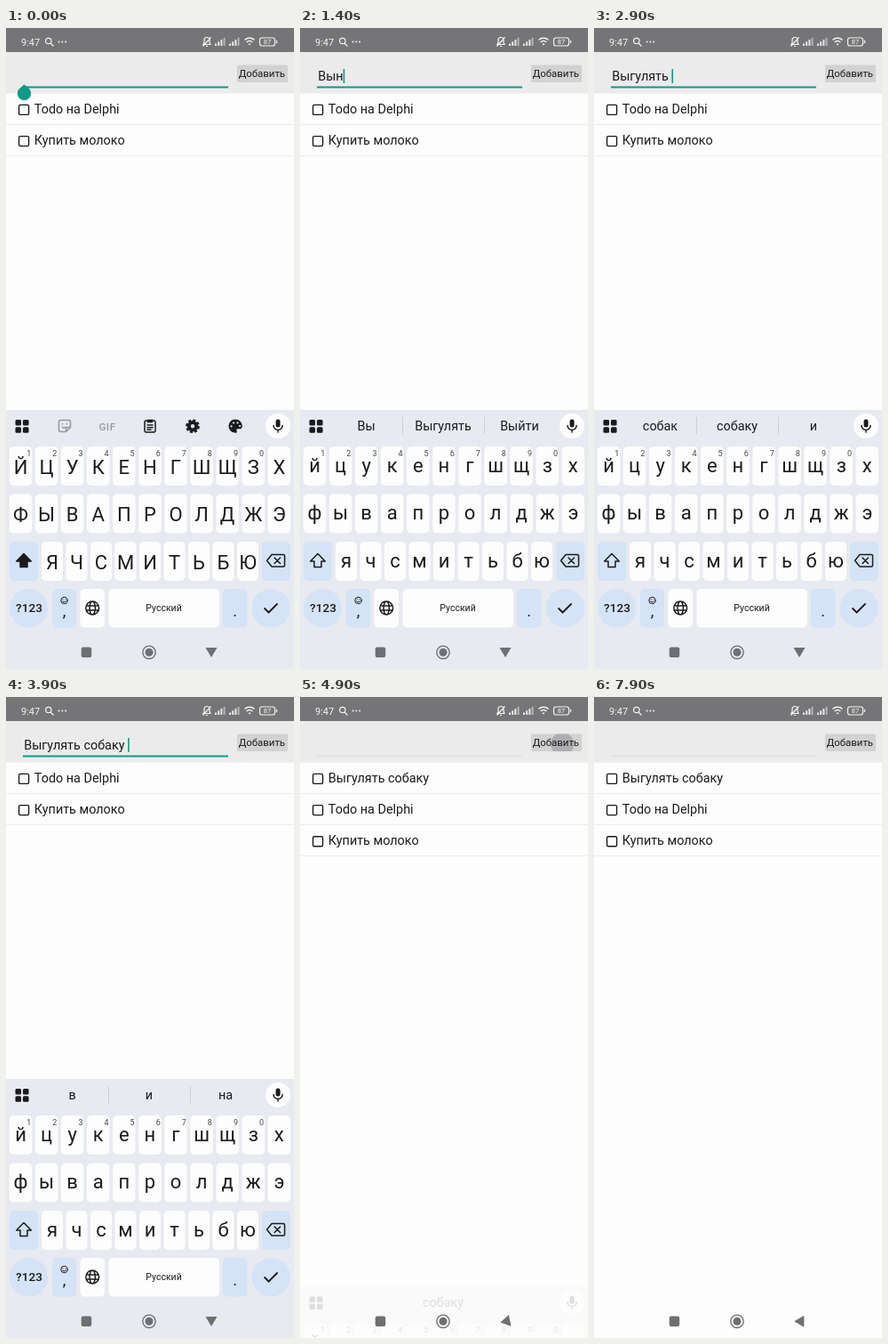
An HTML page that plays this animation: 324x720 px, repeating every 8 s.

```html
<!DOCTYPE html>
<html lang="ru">
<head>
<meta charset="utf-8">
<title>Todo</title>
<style>
  html, body { margin: 0; width: 100%; height: 100%; overflow: hidden; background: #fdfdfd; }
  svg { display: block; width: 324px; height: 720px; font-family: Roboto, sans-serif; }
  text { fill: #1b1b1d; white-space: pre; }
  .body { font-size: 14.4px; }
  .mid { text-anchor: middle; }
  .letter { font-size: 22px; text-anchor: middle; }
  .hint { font-size: 9px; text-anchor: middle; fill: #45464a; }
  .key { fill: #fdfdfd; }
  .mod { fill: #d4e3f5; }
  .line { fill: none; stroke: #1b1b1d; stroke-width: 1.5; stroke-linejoin: round; stroke-linecap: round; }
  .dark { fill: #1b1b1d; }
  .light { fill: none; stroke: #f4f4f4; stroke-width: 1.2; }
  .nav { fill: #6f6f71; }
  .teal { fill: #0d9a88; }
</style>
</head>
<body>
<svg viewBox="0 0 324 720">
  <rect width="324" height="720" fill="#fdfdfd"/>
  <rect y="27" width="324" height="46.5" fill="#ebebec"/>

  <g id="status">
    <rect width="324" height="27" fill="#757577"/>
    <text x="17" y="19.5" font-size="11" style="fill:#f4f4f4">9:47</text>
    <path class="light" d="M50 17l3.5 3.5M51 14.5a3.2 3.2 0 1 1-6.4 0a3.2 3.2 0 1 1 6.4 0"/>
    <path class="light" stroke-linecap="round" style="stroke-width:1.8" d="M59.5 15.5h.1M63.3 15.5h.1M67.1 15.5h.1"/>
    <path class="light" d="M222 18.5h8l-1-2v-3a3 3 0 0 0-6 0v3zM225 20.5h2M221.5 20.5L230.5 10.5"/>
    <g id="signals"></g>
    <path class="light" style="stroke-width:1.5" d="M268.5 13.5a8 8 0 0 1 11 0M270.7 16a5 5 0 0 1 6.6 0M273 18.5a2 2 0 0 1 2 0"/>
    <rect class="light" x="285.5" y="11" width="17" height="9" rx="2.5"/>
    <path class="light" d="M304.5 13.8v3.4"/>
    <text class="mid" x="294" y="18.3" font-size="7.5" style="fill:#f4f4f4">87</text>
  </g>

  <rect id="underline" x="19" y="65.5" width="231" height="2"/>
  <text id="field" class="body" x="20.2" y="59"></text>
  <rect id="cursor" class="teal" y="46" width="1.6" height="16"/>
  <path id="handle" class="teal" d="M20.5 63.5L26 68.3a7.6 7.6 0 1 1-11 0z"/>

  <clipPath id="buttonClip"><rect x="260" y="41.5" width="57" height="19.5" rx="1.5"/></clipPath>
  <g clip-path="url(#buttonClip)">
    <rect x="260" y="41" width="57" height="20" fill="#d2d2d3"/>
    <circle id="ripple" cx="295" cy="53" r="13" fill="#a6a6a8"/>
  </g>
  <text class="mid" x="287.9" y="55" font-size="11.4">Добавить</text>

  <g id="list"></g>

  <g id="keyboard">
    <rect y="429" width="324" height="320" fill="#e8eaf1"/>
    <g id="grid" class="dark"></g>
    <g id="tools">
      <path class="line" style="stroke:#97989c" d="M61.5 440.5h9a2 2 0 0 1 2 2v6l-5 5h-6a2 2 0 0 1-2-2v-9a2 2 0 0 1 2-2zM72.5 448.5h-3a2 2 0 0 0-2 2v3M63.5 444.5v.5M68.5 444.5v.5M63 448.3q2 1.7 4 0"/>
      <text class="mid" x="114" y="451.5" font-size="11.5" font-weight="500" letter-spacing=".6" style="fill:#97989c">GIF</text>
      <path class="line" d="M157.5 441h9a1.5 1.5 0 0 1 1.5 1.5v10a1.5 1.5 0 0 1-1.5 1.5h-9a1.5 1.5 0 0 1-1.5-1.5v-10a1.5 1.5 0 0 1 1.5-1.5zM159.5 440.5h5v2h-5zM159 446h6M159 448.7h6M159 451.3h4"/>
      <circle class="line" cx="210" cy="447.3" r="4.2" style="stroke-width:4"/>
      <circle cx="210" cy="447.3" r="6.6" fill="none" stroke="#1b1b1d" stroke-width="2.6" stroke-dasharray="3 2.184"/>
      <path class="dark" d="M258 439.5a7.6 7.6 0 0 0 0 15.2c2.2 0 2-1.5 1.5-2.4s.2-2 1.5-2h1.8c1.8 0 2.9-1.5 2.9-3.4 0-4-3.5-7.4-7.7-7.4z"/>
      <path d="M253.5 447.3h.1M256 443.5h.1M260.5 443.5h.1M263 447h.1" stroke="#e8eaf1" stroke-width="2.2" stroke-linecap="round"/>
    </g>
    <g id="suggestions">
      <path id="dividers" d="M115.5 437v19M207.5 437v19" stroke="#cccfd6"/>
      <text class="body mid" x="74.5" y="452"></text>
      <text class="body mid" x="161" y="452"></text>
      <text class="body mid" x="247" y="452"></text>
    </g>
    <circle class="key" cx="306" cy="447" r="14"/>
    <rect class="dark" x="303.5" y="439.5" width="5" height="9" rx="2.5"/>
    <path class="line" d="M301 446.5a5 5 0 0 0 10 0M306 451.5v2.5"/>

    <g id="keys"></g>
    <path id="shift" class="line" d="M20 590.5l8.3 8.5h-4.3v6.5h-8v-6.5h-4.3z"/>
    <path class="line" d="M299 591.5h13a1.5 1.5 0 0 1 1.5 1.5v10.5a1.5 1.5 0 0 1-1.5 1.5h-13l-5.5-6.7zM302 595l6.5 6.5M308.5 595l-6.5 6.5"/>
    <text class="mid" x="26" y="656" font-size="13.6" font-weight="500">?123</text>
    <circle class="line" cx="65.5" cy="643" r="3.7" style="stroke-width:1"/>
    <path class="line" style="stroke-width:1" d="M64 642h.1M67 642h.1M63.8 644.3q1.7 1.5 3.4 0"/>
    <text class="mid" x="65.5" y="661" font-size="18">,</text>
    <path class="line" d="M89.8 651.5a7.4 7.4 0 1 0 14.8 0a7.4 7.4 0 1 0-14.8 0M94 651.5a3.2 7.4 0 1 0 6.4 0a3.2 7.4 0 1 0-6.4 0M90.5 649h13.4M90.5 654h13.4"/>
    <text class="mid" x="177.5" y="655" font-size="10.5">Русский</text>
    <text class="mid" x="257.5" y="661" font-size="18">.</text>
    <path class="line" style="stroke-width:1.8" d="M291 652l4.5 4.5l9.5-9.5"/>
  </g>

  <g class="nav">
    <rect x="84.7" y="695.5" width="11.5" height="11.5" rx="2"/>
    <circle cx="161" cy="701.3" r="7.2" fill="none" stroke="#6f6f71" stroke-width="1.4"/>
    <circle cx="161" cy="701.3" r="4.5"/>
    <path id="back" d="M-6.5-5.3h13l-6.5 11z"/>
  </g>
</svg>
<script>
const LOOP = 8000, STEP = 100, ADD_TIME = 4800;
const $ = id => document.getElementById(id);
const clamp = v => Math.max(0, Math.min(1, v));
const rect = (x, y, w, h, r, cls) =>
  `<rect class="${cls}" x="${x}" y="${y}" width="${w}" height="${h}" rx="${r}"/>`;

// [time, value] pairs; a value holds until the next one
const typed = [
  [0, ''], [600, 'В'], [1100, 'Вы'], [1400, 'Вын'], [1700, 'Выну'],
  [2400, 'Выгулять '], [3400, 'Выгулять собаку '], [4300, 'Выгулять собаку'], [ADD_TIME, '']
];
const hints = [
  [0, null], [700, ['В', 'Все', 'Вот']], [1200, ['Вы', 'Выгулять', 'Выйти']],
  [1500, ['Вын', 'Вынести', 'Вынужден']], [1800, ['Выну', 'Выгулять', 'Вынужден']],
  [2900, ['собак', 'собаку', 'и']], [3400, ['в', 'и', 'на']], [4500, ['', 'собаку', '']]
];
const at = (track, t) => track.filter(([start]) => start <= t).pop()[1];

function buildKeys() {
  const rows = [
    { letters: 'йцукенгшщзх', x: 16.5, pitch: 29.08, y: 470, w: 25.4 },
    { letters: 'фывапролджэ', x: 16.5, pitch: 29.08, y: 523.5, w: 25.4 },
    { letters: 'ячсмитьбю', x: 52, pitch: 27.5, y: 577, w: 24 }
  ];
  let out = '';
  rows.forEach((row, r) => [...row.letters].forEach((ch, i) => {
    const x = row.x + i * row.pitch;
    out += rect(x - row.w / 2, row.y, row.w, 44, 5, 'key') +
      `<text class="letter" x="${x}" y="${row.y + 30}">${ch}</text>`;
    if (r === 0 && i < 10) out += `<text class="hint" x="${x + 9.3}" y="481">${(i + 1) % 10}</text>`;
  }));
  out += rect(4, 577, 32, 44, 5, 'mod') + rect(288, 577, 32, 44, 5, 'mod') +
    rect(4, 630, 43, 43.5, 21.5, 'mod') + rect(52, 630, 27, 43.5, 5, 'mod') +
    rect(83.5, 630, 27.5, 43.5, 5, 'key') + rect(115.5, 630, 124.5, 43.5, 5, 'key') +
    rect(244, 630, 27.5, 43.5, 5, 'mod') + rect(276.5, 630, 43.5, 43.5, 21.7, 'mod');
  $('keys').innerHTML = out;
}

function buildIcons() {
  $('grid').innerHTML = [[10.5, 440], [19, 440], [10.5, 448.2], [19, 448.2]]
    .map(([x, y]) => rect(x, y, 6.6, 6.6, 1.5, '')).join('');
  $('signals').innerHTML = [235, 251].map(x => [0, 1, 2, 3].map(i =>
    `<rect x="${x + i * 3.2}" y="${17.5 - i * 2.2}" width="2" height="${2.5 + i * 2.2}" fill="#f4f4f4"
      opacity="${i < 3 ? .9 : .5}"/>`).join('')).join('');
}

function showList(items) {
  $('list').innerHTML = items.map((item, i) => {
    const y = 73 + i * 35.2;
    return `<rect class="line" x="14.6" y="${y + 13.4}" width="11" height="11" rx="1.5" style="stroke-width:1.4"/>
      <text class="body" x="31.8" y="${y + 23}">${item}</text>
      <path d="M0 ${Math.round(y + 34.5) + .5}h324" stroke="#ececec"/>`;
  }).join('');
}

const words = [...document.querySelectorAll('#suggestions text')];
const todo = ['Todo на Delphi', 'Купить молоко'];
let letters, shown = -1;

function render(t) {
  const added = t >= ADD_TIME;
  const text = at(typed, t);
  const hint = at(hints, t);
  const upper = t < 700;

  $('field').textContent = text;
  $('cursor').setAttribute('x', 20.2 + (text ? $('field').getComputedTextLength() : 0));
  $('cursor').style.display = text && t < 4600 ? '' : 'none';
  $('handle').style.display = t < 600 ? '' : 'none';
  $('underline').setAttribute('fill', added ? '#dcdcdd' : '#0d9a88');
  $('underline').setAttribute('height', added ? 1 : 2);
  showList(added ? ['Выгулять собаку', ...todo] : todo);

  $('tools').style.display = hint ? 'none' : '';
  $('suggestions').style.display = hint ? '' : 'none';
  $('dividers').style.display = hint && hint[0] ? '' : 'none';
  if (hint) words.forEach((node, i) => node.textContent = hint[i]);
  letters.forEach(node => {
    const ch = node.textContent;
    node.textContent = upper ? ch.toUpperCase() : ch.toLowerCase();
    node.setAttribute('dy', upper ? .5 : -1.5);
  });
  $('shift').style.fill = upper ? '#1b1b1d' : 'none';

  const hide = clamp((t - 4760) / 160);
  $('keyboard').setAttribute('transform', `translate(0 ${237 * (1 - (1 - hide) ** 2)})`);
  $('keyboard').setAttribute('opacity', 1 - hide);
  $('back').setAttribute('transform', `translate(231 701.3) rotate(${90 * hide})`);

  const fade = clamp((t - 4900) / 500);
  $('ripple').setAttribute('r', 13 + 20 * fade);
  $('ripple').setAttribute('opacity', added ? .8 * (1 - fade) : 0);
}

buildKeys();
buildIcons();
letters = [...document.querySelectorAll('.letter')];
const start = performance.now();

function tick() {
  const t = Math.floor((performance.now() - start) % LOOP / STEP) * STEP;
  if (t !== shown) render(shown = t);
  requestAnimationFrame(tick);
}
tick();
</script>
</body>
</html>
```
